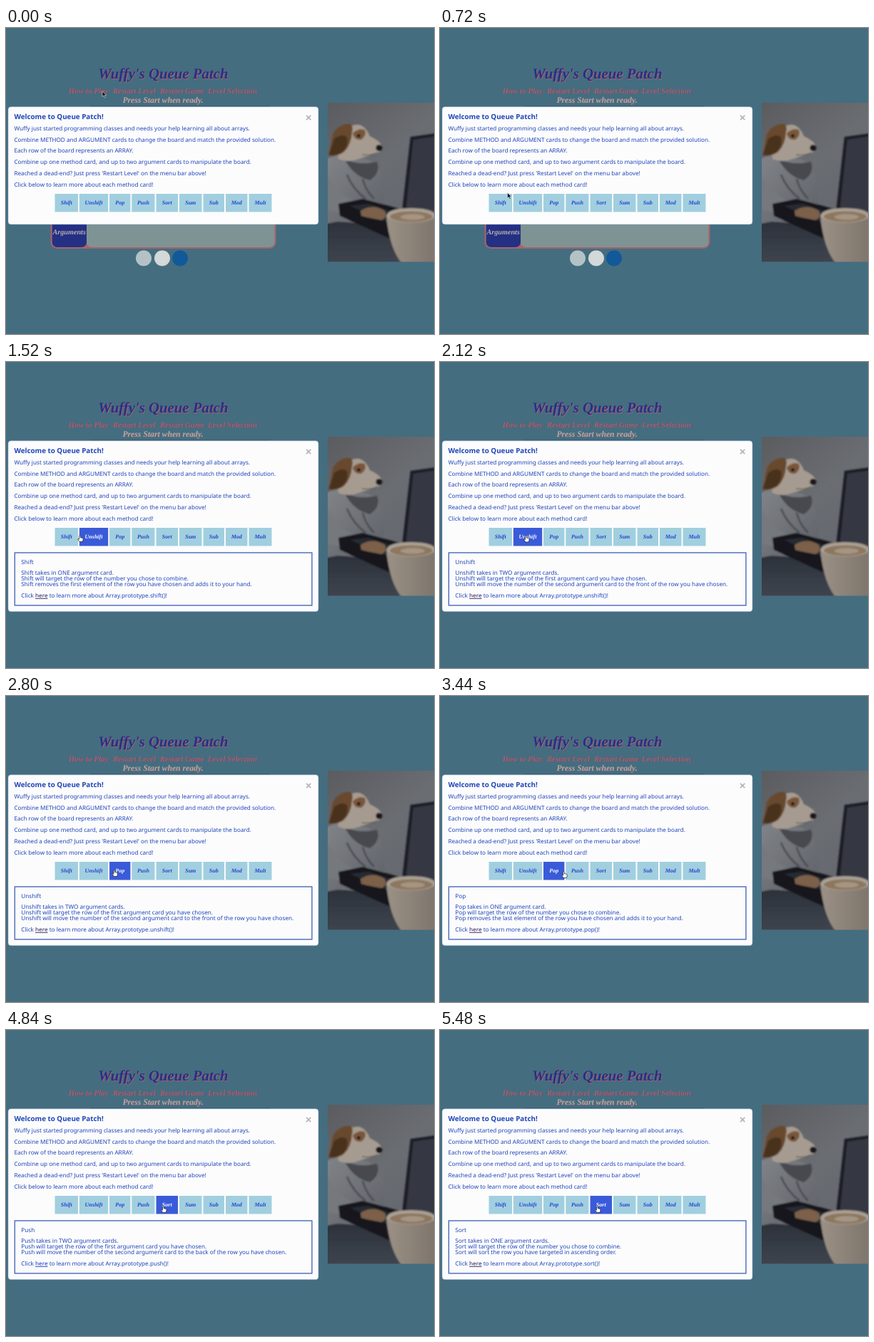
These frames come from a looping animation (600x430 px, 5.52 s). An HTML page:

```html
<!DOCTYPE html>
<html lang="en">
<head>
<meta charset="utf-8">
<title>Wuffy's Queue Patch</title>
<style>
  html, body { margin: 0; width: 100%; height: 100%; overflow: hidden; background: #446d80; }
  svg { display: block; width: 600px; height: 430px; }
  text { text-rendering: geometricPrecision; white-space: pre; }
  .script { font-family: "Liberation Serif", "Noto Serif", serif; font-weight: bold; font-style: italic; }
  .title { font-size: 20.8px; }
  .menu { font-size: 11.1px; }
  .status { font-size: 11.7px; }
  .body { font-family: "Noto Sans", "Open Sans", sans-serif; font-size: 8.17px; fill: #1f45b8; }
  .head { font-size: 9.8px; font-weight: bold; }
  .btn rect { fill: #a1cfdf; }
  .btn text { font-size: 8px; fill: #2444cf; text-anchor: middle; }
  .btn.on rect { fill: #3a5bd9; }
  .btn.on text { fill: #fff; }
  .link { text-decoration: underline; }
</style>
</head>
<body>
<svg viewBox="0 0 600 430" xmlns="http://www.w3.org/2000/svg">
  <defs>
    <linearGradient id="wall" x1="0" y1="0" x2=".6" y2="1">
      <stop offset="0" stop-color="#5b5c60"/>
      <stop offset=".5" stop-color="#6a6d72"/>
      <stop offset="1" stop-color="#62666d"/>
    </linearGradient>
    <linearGradient id="hoodie" x1="0" y1="0" x2="1" y2="1">
      <stop offset="0" stop-color="#82858a"/>
      <stop offset="1" stop-color="#5d6066"/>
    </linearGradient>
    <linearGradient id="desk" x1="0" y1="0" x2="0" y2="1">
      <stop offset="0" stop-color="#2c313a"/>
      <stop offset="1" stop-color="#414853"/>
    </linearGradient>
    <linearGradient id="mug" x1="0" y1="0" x2="1" y2="0">
      <stop offset="0" stop-color="#9b9186"/>
      <stop offset="1" stop-color="#7d746b"/>
    </linearGradient>
    <filter id="soft" x="0" y="0" width="1" height="1"><feGaussianBlur stdDeviation=".8"/></filter>
    <clipPath id="photo"><rect x="451" y="105" width="149" height="223.5"/></clipPath>
  </defs>
  <rect width="600" height="430" fill="#446d80"/>

  <g class="script" id="header" text-anchor="middle"></g>
  <rect x="118" y="109" width="252" height="2" fill="#3d6072"/>

  <!-- board and round badges -->
  <rect x="62.5" y="200" width="316" height="110" rx="9" fill="#a8636b"/>
  <rect x="113" y="202" width="263.5" height="106" rx="7" fill="#7e9393"/>
  <rect x="64.7" y="202" width="48.3" height="106" rx="7" fill="#243083"/>
  <text class="script" x="88.7" y="290" font-size="10.2" fill="#b9b0b0" text-anchor="middle">Arguments</text>
  <circle cx="193" cy="323.5" r="11" fill="#b5c2c5"/>
  <circle cx="219" cy="323.5" r="11" fill="#d3d8d8"/>
  <circle cx="244" cy="323.5" r="11" fill="#115999"/>

  <!-- photo -->
  <g clip-path="url(#photo)">
    <rect x="451" y="105" width="149" height="224" fill="url(#wall)"/>
    <g filter="url(#soft)">
      <path d="M440 270L610 284V340H440Z" fill="url(#desk)"/>
      <path d="M440 190Q460 176 476 180L506 184Q522 190 526 208Q534 236 528 258L502 272Q470 268 440 278Z" fill="url(#hoodie)"/>
      <path d="M474 183Q492 194 520 188Q526 204 510 214Q486 208 474 183Z" fill="#474a50"/>
      <path d="M451 208Q466 240 508 248L506 262Q468 262 440 252Z" fill="#75787d"/>
      <path d="M478 206Q486 226 504 240M500 212Q504 228 516 240" fill="none" stroke="#484b51" stroke-width="2.5"/>
      <path d="M466 184Q462 164 472 150Q480 134 496 136Q506 140 510 152Q524 158 527 166Q527 175 517 177Q504 181 494 184Q480 190 466 184Z" fill="#a69b90"/>
      <path d="M458 150Q464 136 481 134.5Q488 136 485 147Q484 164 474 174Q466 181 452 179Q456 164 458 150Z" fill="#68482f"/>
      <path d="M460 156Q470 148 478 153Q481 169 468 176Q459 180 453 178Z" fill="#49321f"/>
      <path d="M486 148Q494 140 503 143Q506 151 498 157Q488 158 486 148Z" fill="#79573b"/>
      <circle cx="494.5" cy="151.5" r="2.3" fill="#15110f"/>
      <ellipse cx="523" cy="168.5" rx="4.5" ry="4.5" fill="#1c191a"/>
      <path d="M499 178Q511 180 521 175" fill="none" stroke="#4c423b"/>
      <path d="M466 247L500 240L610 270V302L560 306L468 264Z" fill="#16191f"/>
      <path d="M482 250L508 247L570 268L548 279Z" fill="#272b33"/>
      <path d="M497 257Q514 246 531 257Q536 266 526 270Q508 267 498 264Z" fill="#7b6049"/>
      <path d="M567 153L610 147V278L555 259Z" fill="#1b1e25"/>
      <path d="M571 157L610 151V266L561 252Z" fill="#343943"/>
      <path d="M533 264Q536 253 567 253Q598 253 602 262L604 332H556Q538 312 533 264Z" fill="url(#mug)"/>
      <ellipse cx="568" cy="263.5" rx="34" ry="10" fill="#aaa298"/>
      <ellipse cx="568" cy="265" rx="30" ry="7.5" fill="#8e775f"/>
      <ellipse cx="570" cy="265.5" rx="17" ry="4" fill="#a59584"/>
    </g>
  </g>

  <!-- dialog -->
  <rect id="dialog" x="3" y="110.7" width="435" height="165.3" rx="4" fill="#fcfcfd" stroke="#7fa0cf" stroke-width=".5"/>
  <g class="body" id="intro"></g>
  <text x="424.2" y="131.4" font-family="Liberation Sans, sans-serif" font-weight="bold" font-size="15" fill="#b2b2b4" text-anchor="middle">×</text>
  <g id="buttons"></g>
  <g class="body" id="panel">
    <rect x="12.3" y="268" width="416.6" height="74" fill="none" stroke="#4a69b9" stroke-width="1.4"/>
    <text id="name" x="21.3" y="283.7"></text>
    <text id="line0" x="21.3" y="299.4"></text>
    <text id="line1" x="21.3" y="307.4"></text>
    <text id="line2" x="21.3" y="315.3"></text>
    <text x="21.3" y="331.2">Click <tspan class="link" id="link">here</tspan><tspan id="more"></tspan></text>
  </g>

  <!-- pointers, tip at 0,0 -->
  <path id="arrow" d="M0 0V7.6L1.8 6L3.1 9L4.5 8.4L3.2 5.5H5.6Z" fill="#111" stroke="#e8e8e8" stroke-width=".6"/>
  <path id="hand" d="M-.9 .6Q0-.6 .9 .6V3.2Q1.8 2.7 2.3 3.5Q3.1 3 3.6 3.9Q4.6 3.6 4.7 4.8V6.2L3.9 9H-.5L-2.7 5.6Q-2.8 4.5-1.7 4.8L-.9 5.7Z" fill="#fff" stroke="#16161c" stroke-width=".7"/>
</svg>
<script>
const LOOP = 5520, STEP = 40;
const $ = id => document.getElementById(id);

function add(parent, tag, attrs, text = "") {
  const el = document.createElementNS("http://www.w3.org/2000/svg", tag);
  for (const key in attrs) el.setAttribute(key, attrs[key]);
  el.textContent = text;
  parent.append(el);
  return el;
}

// text with a hard drop shadow
function heading(kind, x, y, text, fill, shade, drop) {
  add($("header"), "text", { class: kind, x: x + drop, y: y + drop, fill: shade }, text);
  add($("header"), "text", { class: kind, x, y, fill }, text);
}

heading("title", 220.4, 71.4, "Wuffy's Queue Patch", "#272f86", "#b0606c", 0.9);
[["How to Play", 115.8], ["Restart Level", 180], ["Restart Game", 247.2], ["Level Selection", 317.6]]
  .forEach(([label, x]) => heading("menu", x, 91.5, label, "#ac5f6b", "#4f5276", 0.6));
heading("status", 220, 105, "Press Start when ready.", "#b2a9a6", "#7d6270", 0.6);

add($("intro"), "text", { class: "head", x: 11.4, y: 128.2 }, "Welcome to Queue Patch!");
[
  "Wuffy just started programming classes and needs your help learning all about arrays.",
  "Combine METHOD and ARGUMENT cards to change the board and match the provided solution.",
  "Each row of the board represents an ARRAY.",
  "Combine up one method card, and up to two argument cards to manipulate the board.",
  "Reached a dead-end? Just press 'Restart Level' on the menu bar above!",
  "Click below to learn more about each method card!"
].forEach((line, i) => add($("intro"), "text", { x: 11.4, y: 143.8 + i * 15.76 }, line));

// label, left edge, right edge
const buttons = [
  ["Shift", 68.5, 101], ["Unshift", 102.8, 143.2], ["Pop", 145, 174.4],
  ["Push", 176.3, 208.5], ["Sort", 210.5, 241], ["Sum", 243, 274.5],
  ["Sub", 276.5, 306], ["Mod", 308, 338.5], ["Mult", 340.5, 372.5]
].map(([label, left, right]) => {
  const el = add($("buttons"), "g", { class: "btn script" });
  add(el, "rect", { x: left, y: 233, width: right - left, height: 25.5 });
  add(el, "text", { x: (left + right) / 2, y: 248.4 }, label);
  return { el, left, right };
});

const byNumber = "the number you chose to combine.";
const byCard = "the first argument card you have chosen.";
const pages = [
  { at: 1000, name: "Shift", takes: "ONE argument card.", row: byNumber,
    does: "removes the first element of the row you have chosen and adds it to your hand." },
  { at: 2000, name: "Unshift", takes: "TWO argument cards.", row: byCard,
    does: "will move the number of the second argument card to the front of the row you have chosen." },
  { at: 3000, name: "Pop", takes: "ONE argument card.", row: byNumber,
    does: "removes the last element of the row you have chosen and adds it to your hand." },
  { at: 3840, name: "Push", takes: "TWO argument cards.", row: byCard, fresh: true,
    does: "will move the number of the second argument card to the back of the row you have chosen." },
  { at: 4960, name: "Sort", takes: "ONE argument cards.", row: byNumber,
    does: "will sort the row you have targeted in ascending order." }
];

// time, x, y of the pointer tip
const path = [
  [0, 135, 88.8], [120, 135, 88.8], [640, 94.6, 231.6], [720, 94.6, 231.6],
  [900, 86, 244], [1240, 86, 244], [1520, 103.4, 243.6], [1800, 119, 244],
  [2320, 121, 244], [2760, 151.8, 244.6], [3160, 152, 245], [3440, 173.5, 246.6],
  [3720, 185.6, 246.6], [4280, 185.6, 246.6], [4800, 220.3, 247.6], [LOOP, 220.3, 247.6]
];

function pointerAt(t) {
  const i = path.findIndex(p => p[0] > t);
  const [t0, x0, y0] = path[i - 1], [t1, x1, y1] = path[i];
  const u = (t - t0) / (t1 - t0), k = u * u * (3 - 2 * u);
  return [x0 + (x1 - x0) * k, y0 + (y1 - y0) * k];
}

let shown = null;
function showPage(page) {
  if (page === shown) return;
  shown = page;
  $("dialog").setAttribute("height", page ? 240 : 165.3);
  $("panel").style.display = page ? "" : "none";
  if (!page) return;
  const { name, takes, row, does, fresh } = page;
  $("name").textContent = name;
  $("line0").textContent = `${name} takes in ${takes}`;
  $("line1").textContent = `${name} will target the row of ${row}`;
  $("line2").textContent = `${name} ${does}`;
  $("more").textContent = ` to learn more about Array.prototype.${name.toLowerCase()}()!`;
  $("link").style.fill = fresh ? "#1238c4" : "#2a1d58";
}

function draw(t) {
  const [x, y] = pointerAt(t);
  let over = false;
  for (const { el, left, right } of buttons) {
    const on = y >= 233 && y <= 258.5 && x >= left && x <= right;
    el.classList.toggle("on", on);
    over = over || on;
  }
  for (const id of ["arrow", "hand"]) {
    $(id).setAttribute("transform", `translate(${x} ${y})`);
    $(id).style.display = (id === "hand") === over ? "" : "none";
  }
  showPage(pages.filter(p => p.at <= t).pop());
}

function tick() {
  const t = performance.now() % LOOP;
  draw(Math.floor(t / STEP) * STEP);
  requestAnimationFrame(tick);
}
tick();
</script>
</body>
</html>
```
